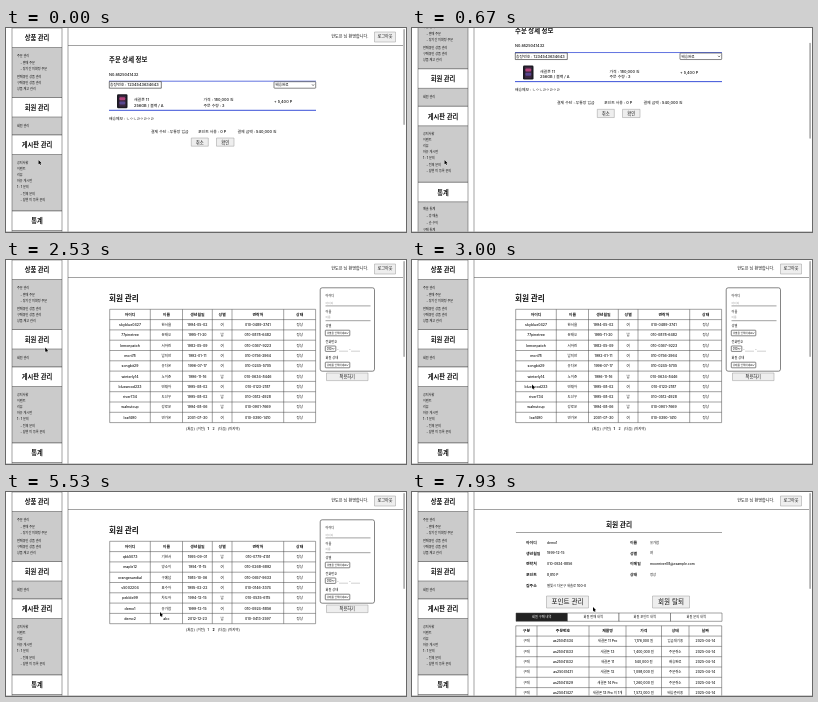
An HTML page with a canvas that plays this animation: 400 px wide and 204 px high, repeating every 8000 ms.

```html
<!DOCTYPE html>
<html lang="ko">
<head>
<meta charset="utf-8">
<style>
html, body { margin: 0; width: 100%; height: 100%; overflow: hidden; background: #fff; }
canvas { display: block; width: 400px; height: 204px; }
</style>
</head>
<body>
<canvas id="stage"></canvas>
<script>
const W = 400, H = 204, LOOP = 8000, FPS = 15;
const FONT = 'Inter, "Noto Sans CJK KR", "Noto Sans CJK", sans-serif';
const INK = '#111', RULE = '#444', BLUE = '#3a50d8';
const canvas = document.getElementById('stage');
const ctx = canvas.getContext('2d');
const ratio = window.devicePixelRatio || 1;
canvas.width = W * ratio;
canvas.height = H * ratio;

// Keys: time in ms, then values
const SCROLL = [[0, 0], [67, 2], [133, 9], [333, 34], [467, 38], [600, 32], [800, 22]];
const POINTER = [
  [0, 32.5, 132], [867, 32.5, 132], [1067, 22, 110], [1200, 13, 90], [1400, 16, 77.5],
  [1733, 16, 77.5], [1933, 16.5, 77], [2400, 16.5, 77], [2667, 62, 98], [3000, 120, 124.5],
  [3133, 150, 143], [3200, 153, 145], [3333, 153, 145], [3667, 193, 160], [3933, 209, 167],
  [4067, 209, 167], [4467, 207, 168.5], [5133, 207, 168.5], [5333, 170, 131], [5533, 154, 120],
  [5800, 154, 120], [6133, 136, 114.5], [6400, 127, 117], [6667, 123.6, 117], [7400, 123.6, 117],
  [7467, 124.2, 117], [7600, 124.2, 117], [7800, 160, 116], [7933, 181, 115]
];

const MENU = [
  { title: '상품 관리', top: 0, bottom: 69.5, items: [
    ['주문 관리', 28], ['- 판매 주문', 34.5], ['- 장기간 미확정 주문', 41],
    ['판매중인 상품 관리', 49], ['구매중인 상품 관리', 55], ['상품 재고 관리', 61]] },
  { title: '회원 관리', top: 69.5, bottom: 107, items: [['회원 관리', 98]] },
  { title: '게시판 관리', top: 107, bottom: 183, items: [
    ['공지사항', 134.5], ['이벤트', 141], ['리뷰', 147], ['자유 게시판', 153],
    ['1 : 1 문의', 159], ['- 전체 문의', 165.5], ['- 답변 미 등록 문의', 172]] },
  { title: '통계', top: 183, bottom: 262, items: [
    ['매출 통계', 210], ['- 총 매출', 217], ['- 순 수익', 223.5], ['구매 통계', 231],
    ['- 상품 판매', 237.5]] }
];

const MEMBERS = [
  `skyblue0427 한서율 1994-05-02 여
77pinetree 문태오 1995-11-20 남
lemonpatch 서하린 1982-05-09 여
mori78 남지안 1992-01-11 여
songbit29 유다온 1996-07-17 여
winterly14 노이준 1996-11-16 남
bluewood233 민채아 1995-08-02 여
river734 도선우 1995-08-02 남
walnutcup 강로운 1994-08-06 남
leaf490 연가온 2001-07-30 여`,
  `qbk5073 기현서 1995-09-01 남
maple12 양소이 1994-11-15 여
orangesundial 구예담 1985-10-06 여
v5002204 표수아 1995-02-22 여
pebble99 차도하 1994-12-15 남
demo1 유가람 1999-12-15 여
demo2 abc 2012-12-23 남`
].map((block, page) => block.split('\n').map((line, i) => {
  const seed = page * 10 + i + 1;
  const tail = String(1000 + seed * 2741 % 9000);
  return [...line.split(' '), `010-0${100 + seed * 389 % 900}-${tail}`, '정상'];
}).map(([id, name, birth, sex, phone, state]) => [id, name, birth, sex, phone, state]));

const ORDERS = [
  ['34', '새결폰 11 Pro', '1,176,000', '입금대기중'],
  ['33', '새결폰 13', '1,400,000', '주문취소'],
  ['32', '새결폰 11', '540,000', '배송완료'],
  ['31', '새결폰 12', '1,098,000', '주문취소'],
  ['29', '새결폰 14 Pro', '1,260,000', '주문취소'],
  ['27', '새결폰 13 Pro 외 1개', '1,572,000', '배송준비중']
].map(([no, item, price, state]) =>
  ['구매', 'as250414' + no, item, price + ' 원', state, '2025-04-14']);

function sample(keys, t) {
  let i = 0;
  while (i < keys.length - 1 && keys[i + 1][0] <= t) i++;
  const a = keys[i], b = keys[i + 1] || a;
  const p = a === b ? 0 : (t - a[0]) / (b[0] - a[0]);
  return a.slice(1).map((v, n) => v + (b[n + 1] - v) * p);
}

function text(str, x, y, size = 3.9, { weight = 500, align = 'left', color = INK } = {}) {
  ctx.font = `${weight} ${size}px ${FONT}`;
  ctx.textAlign = align;
  ctx.fillStyle = color;
  ctx.fillText(str, x, y + size * 0.36);
}

const centered = (str, x, y, size, weight = 500, color = INK) =>
  text(str, x, y, size, { weight, align: 'center', color });

function rect(x, y, w, h, fill, stroke, width = 0.5, radius = 0) {
  ctx.beginPath();
  ctx.roundRect(x, y, w, h, radius);
  if (fill) { ctx.fillStyle = fill; ctx.fill(); }
  if (stroke) { ctx.strokeStyle = stroke; ctx.lineWidth = width; ctx.stroke(); }
}

function line(x1, y1, x2, y2, color = RULE, width = 0.5) {
  ctx.beginPath();
  ctx.moveTo(x1, y1);
  ctx.lineTo(x2, y2);
  ctx.strokeStyle = color;
  ctx.lineWidth = width;
  ctx.stroke();
}

function button(label, x, y, w, h, size, weight) {
  rect(x, y, w, h, '#eee', '#999');
  centered(label, x + w / 2, y + h / 2, size, weight);
}

function select(label, x, y, w, h, size) {
  rect(x, y, w, h, '#fff', '#333', 0.6, 0.6);
  text(label, x + 1.4, y + h / 2, size);
  const cx = x + w - 2.6, cy = y + h / 2;
  line(cx - 1, cy - 0.5, cx, cy + 0.6, INK, 0.6);
  line(cx, cy + 0.6, cx + 1, cy - 0.5, INK, 0.6);
}

function table(edges, top, rowHeight, head, rows, size) {
  const left = edges[0], right = edges[edges.length - 1];
  const bottom = top + rowHeight * (rows.length + 1);
  [head, ...rows].forEach((cells, r) => {
    const y = top + rowHeight * r;
    line(left, y, right, y);
    cells.forEach((cell, c) => centered(cell, (edges[c] + edges[c + 1]) / 2,
      y + rowHeight / 2, r ? size : 3.9, r ? 500 : 700));
  });
  line(left, bottom, right, bottom);
  edges.forEach(x => line(x, top, x, bottom));
  return bottom;
}

function sidebar() {
  rect(6, 0, 50, 262, '#cbcbcb');
  for (const { title, top, bottom, items } of MENU) {
    rect(6, top, 50, 19.5, '#fff');
    line(6, top, 56, top);
    line(6, top + 19.5, 56, top + 19.5);
    line(6, bottom, 56, bottom);
    centered(title, 31, top + 10, 6.3, 700);
    for (const [label, y] of items) text(label, label[0] === '-' ? 14.5 : 11, y, 3.1);
  }
  line(6, 0, 6, 262);
  line(56, 0, 56, 262);
}

function topBar() {
  line(62, 17.5, 397, 17.5);
  text('한도윤 님 환영합니다.', 362.5, 9, 4.1, { align: 'right' });
  button('로그아웃', 368.5, 4, 21, 10, 4.1);
}

function phone(x, y) {
  rect(x, y, 10.5, 14, '#1b1a22', null, 0, 1.2);
  rect(x + 1.8, y + 1.2, 7, 11.4, '#3b2740', null, 0, 0.8);
  rect(x + 2.4, y + 3, 5.8, 3, '#b0427a', null, 0, 1);
  rect(x + 2.4, y + 7.2, 5.8, 3, '#57468f', null, 0, 1);
}

function orderPage() {
  text('주문 상세 정보', 103, 31.5, 6.4, { weight: 700 });
  text('No.as25041432', 103, 46.2, 3.9);
  line(103, 53.2, 310, 53.2, BLUE, 0.8);
  rect(103.3, 53.6, 52, 6.6, '#fff', '#222', 0.6);
  text('송장번호 : 1234543634643', 104, 57, 3.9);
  select('배송완료', 268, 53.7, 41.7, 6.5, 3.6);
  phone(111, 66.2);
  text('새결폰 11', 128, 71.8);
  text('256GB / 블랙 / A', 128, 77.3);
  text('가격 : 180,000 원', 197.5, 71.8);
  text('주문 수량 : 3', 197.5, 77.3);
  text('+ 5,400 P', 268, 73.3);
  line(103, 82.3, 310, 82.3, BLUE, 1);
  text('배송메모 : ㄴㅇㄴㄹㅇㄹㅇㄹ', 103, 90.2, 3.8);
  text('결제 수단 : 무통장 입금', 145, 103.6);
  text('포인트 사용 : 0 P', 192, 103.6);
  text('결제 금액 : 540,000 원', 231.5, 103.6);
  button('취소', 185.3, 110, 17, 8.2, 4.3);
  button('확인', 210.5, 110, 17.5, 8.2, 4.3);
}

function searchPanel() {
  const label = (str, y) => text(str, 319.5, y, 3.2);
  const field = (str, y) => {
    text(str, 319.5, y, 2.8, { color: '#999' });
    line(319.5, y + 3.3, 364.5, y + 3.3);
  };
  rect(314.2, 27.8, 54.3, 83.4, '#fff', '#333', 0.6, 2);
  label('아이디', 36.3);
  field('아이디', 42.6);
  label('이름', 51.4);
  field('이름', 57.4);
  label('성별', 66.2);
  select('성별을 선택하세요', 319.3, 70.2, 24.5, 5.6, 2.6);
  label('전화번호', 82.3);
  select('010', 319.3, 86, 10.5, 5.4, 2.8);
  for (const x of [333, 345]) {
    text('-', x - 1.8, 88.8, 2.8);
    line(x, 91.2, x + 9, 91.2, '#888', 0.4);
  }
  label('회원 상태', 98.3);
  select('상태를 선택하세요', 319.3, 102.2, 24.5, 5.6, 2.6);
  button('적용하기', 320.5, 113, 41.5, 7.6, 4.2);
}

function listPage(page) {
  text('회원 관리', 103, 38.4, 7.6, { weight: 700 });
  const bottom = table([103.7, 144.3, 176.5, 206.3, 226, 277.7, 309.6], 49.3, 10.3,
    ['아이디', '이름', '생년월일', '성별', '연락처', '상태'], MEMBERS[page], 3.5);
  const y = bottom + 6;
  [['[처음]', 180], ['[이전]', 190.5], ['1', 201.5], ['2', 206.5], ['[다음]', 211.8],
    ['[마지막]', 222]].forEach(([str, x], i) =>
    text(str, x, y, 3.4, { weight: i === page + 2 ? 700 : 500 }));
  searchPanel();
}

function detailPage() {
  centered('회원 관리', 207, 33, 6.7, 700);
  line(104, 40.5, 310, 40.5);
  [['아이디', 'demo1', '이름', '유가람'],
    ['생년월일', '1999-12-15', '성별', '여'],
    ['연락처', MEMBERS[1][5][4], '이메일', 'moonriver08@example.com'],
    ['포인트', '8,810 P', '상태', '정상'],
    ['집주소', '별빛시 다온구 새솔로 100-0']].forEach((cells, r) => cells.forEach((str, c) => {
    const isLabel = c % 2 === 0;
    text(str, [114, 135, 218, 238][c], 50.6 + r * 10.7, isLabel ? 3.9 : 3.3,
      { weight: isLabel ? 700 : 500 });
  }));
  button('포인트 관리', 134.5, 104, 42, 12, 6.6, 500);
  button('회원 탈퇴', 240.5, 104, 37, 12, 6.6, 500);
  ['구매', '판매', '포인트', '문의'].forEach((kind, i) => {
    const x = 104 + i * 51.5;
    rect(x, 121, 51.5, 8.3, i ? '#fff' : '#222', RULE);
    centered(`회원 ${kind} 내역`, x + 25.7, 125.2, 3.2, 500, i ? INK : '#fff');
  });
  table([103.8, 125, 177, 214, 249.5, 277, 309.7], 133.8, 10.3,
    ['구분', '주문번호', '제품명', '가격', '상태', '날짜'], ORDERS, 3.4);
}

function pointer(x, y) {
  ctx.beginPath();
  [[0, 0], [0, 4.5], [1, 3.6], [1.7, 5.1], [2.4, 4.8], [1.8, 3.3], [3.2, 3.2]]
    .forEach(([dx, dy]) => ctx.lineTo(x + dx, y + dy));
  ctx.closePath();
  ctx.lineJoin = 'round';
  ctx.strokeStyle = '#fff';
  ctx.lineWidth = 0.7;
  ctx.stroke();
  ctx.fillStyle = '#000';
  ctx.fill();
}

function draw(time) {
  const t = Math.floor((time % LOOP + 4) * FPS / 1000) * 1000 / FPS;
  const scroll = t < 2330 ? sample(SCROLL, t)[0] : 0;
  ctx.setTransform(ratio, 0, 0, ratio, 0, 0);
  rect(0, 0, W, H, '#fff');
  line(62, 0, 62, H);
  ctx.save();
  ctx.translate(0, -scroll);
  sidebar();
  topBar();
  if (t < 2330) orderPage();
  else if (t < 4860) listPage(0);
  else if (t < 7330) listPage(1);
  else detailPage();
  ctx.restore();
  rect(397.3, 1 + scroll * 0.48, 1.6, 96, '#aaa', null, 0, 0.8);
  line(0, 203.6, W, 203.6, '#aaa', 0.6);
  pointer(...sample(POINTER, t));
}

function tick(now) {
  draw(now);
  requestAnimationFrame(tick);
}
draw(0);
requestAnimationFrame(tick);
</script>
</body>
</html>
```
